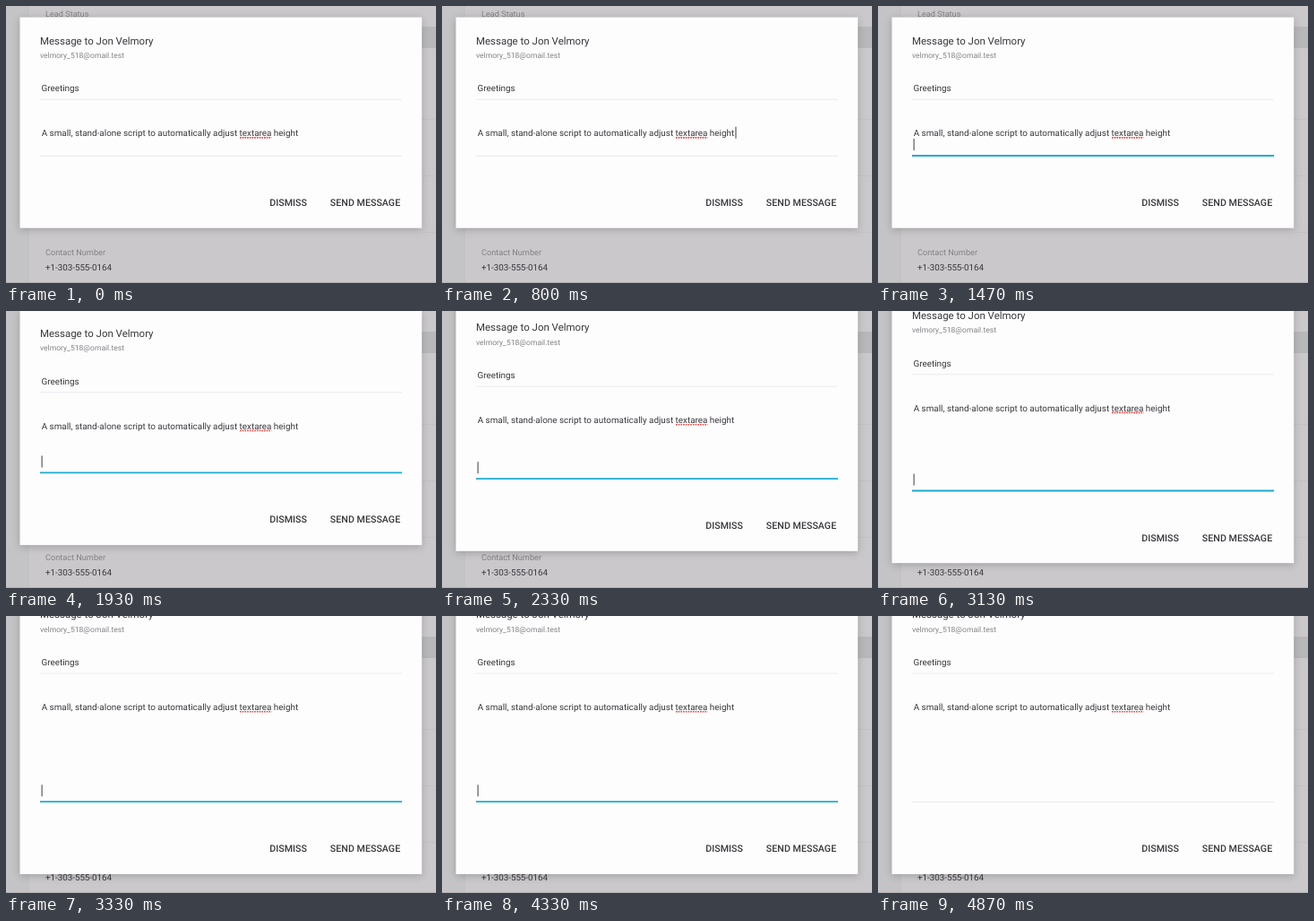
An HTML page for the animation above (5590 ms loop, 480 by 309 pixels).

```html
<!DOCTYPE html>
<html lang="en">
<head>
<meta charset="utf-8">
<title>Growing message field</title>
<style>
  html, body { margin: 0; width: 100%; height: 100%; overflow: hidden; background: #cac8cb; }
  svg { display: block; width: 100%; height: 100%; }
  text { font-family: Roboto, "Noto Sans", sans-serif; font-size: 9.88px; fill: #38373b; text-rendering: geometricPrecision; }
  .label { font-size: 9.17px; fill: #828184; }
  .title { font-size: 11.47px; }
  .mail { font-size: 8.56px; fill: #838286; }
  .button { font-size: 10.7px; font-weight: 500; }
  .rule { stroke: #ebe9ec; }
  #sheet { fill: #fefdfe; filter: drop-shadow(0 2px 4px rgba(0, 0, 0, .2)); }
  #bar { stroke: #1cacd0; stroke-width: 1.8; }
  #caret { fill: #3a393d; }
  .typo { stroke: #e04a45; stroke-width: 1.6; stroke-dasharray: 1.7 1; }
</style>
</head>
<body>
<svg viewBox="0 0 480 309">
  <!-- dimmed page -->
  <rect width="480" height="309" fill="#cac8cb"/>
  <rect width="25" height="309" fill="#c4c3c5"/>
  <rect x="464" y="23" width="16" height="24" fill="#b8b7b9"/>
  <path d="M25.5 0V309M464 126.5H480M464 189.5H480M464 252.5H480" stroke="#c0bfc1" stroke-width=".7"/>
  <rect y="308" width="480" height="1" fill="#b2b1b3"/>
  <text class="label" x="44" y="11.8">Lead Status</text>
  <text class="label" x="44" y="278.4">Contact Number</text>
  <text x="44" y="295.1" style="font-size:9.78px">+1-303-555-0164</text>

  <!-- dialog -->
  <rect id="sheet" x="15.5" width="448.7"/>
  <g id="upper">
    <text class="title" x="38" y="42.6">Message to Jon Velmory</text>
    <text class="mail" x="38" y="57.8">velmory_518@omail.test</text>
    <text x="39.5" y="95">Greetings</text>
    <path class="rule" d="M38 104.3H442"/>
    <text x="39.7" y="145">A small, stand-alone script to automatically adjust textarea height</text>
    <path class="typo" d="M261 146.9H296.5"/>
    <rect id="caret" width="1" height="13"/>
  </g>
  <g id="lower">
    <path class="rule" d="M38 167.3H442"/>
    <line id="bar" y1="167" y2="167"/>
    <text class="button" x="294.3" y="223.1">DISMISS</text>
    <text class="button" x="361.8" y="223.1">SEND MESSAGE</text>
  </g>
</svg>
<script>
  const LOOP = 5590;
  const LINE = 13.4;
  const FOCUS = 800, BLUR = 4670;
  // times at which Enter moves the caret down one line
  const ENTERS = [1470, 1600, 1930, 2330, 2670, 3000, 3330];
  const BLINKS = [[1330, 1470], [3870, 4330]];

  const [sheet, upper, lower, caret, bar] =
    ["sheet", "upper", "lower", "caret", "bar"].map(id => document.getElementById(id));

  function set(el, attrs) {
    for (const name in attrs) el.setAttribute(name, attrs[name]);
  }

  function ease(from, to, t) {
    const p = Math.min(1, Math.max(0, (t - from) / (to - from)));
    return p < .5 ? 4 * p ** 3 : 1 - 4 * (1 - p) ** 3;
  }

  function draw(t) {
    const row = ENTERS.filter(time => t >= time).length;
    // two rows fit; each further one grows the centred dialog both ways
    const shift = Math.max(0, row - 1) * LINE / 2;
    set(sheet, { y: 12.6 - shift, height: 235.1 + 2 * shift });
    set(upper, { transform: `translate(0 ${-shift})` });
    set(lower, { transform: `translate(0 ${shift})` });

    const hidden = t < FOCUS || t >= BLUR || BLINKS.some(([a, b]) => t >= a && t < b);
    set(caret, { x: row ? 39.6 : 327.5, y: 134.7 + row * LINE, opacity: hidden ? 0 : 1 });

    const half = 202 * (ease(FOCUS - 10, 1190, t) - ease(BLUR - 10, 4870, t));
    set(bar, { x1: 240 - half, x2: 240 + half });
  }

  const start = performance.now();
  function tick() {
    draw((performance.now() - start) % LOOP);
    requestAnimationFrame(tick);
  }
  tick();
</script>
</body>
</html>
```
